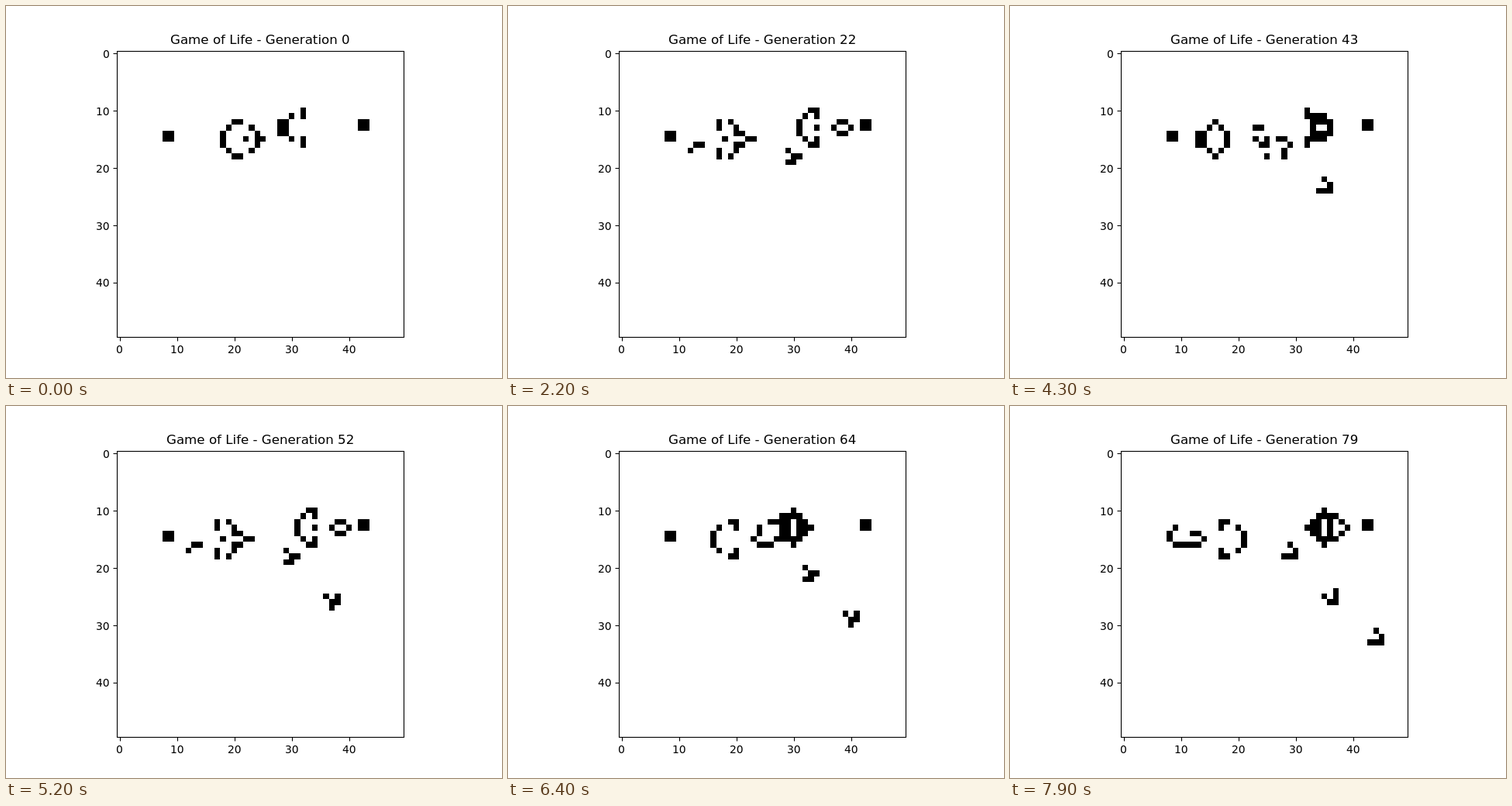
Recreate the animation shown at these times as an HTML page with a canvas. Size 640 by 480 pixels, loop 8 s.

```html
<!DOCTYPE html>
<html lang="en">
<head>
<meta charset="utf-8">
<title>Game of Life</title>
<style>
  html, body { margin: 0; width: 100%; height: 100%; overflow: hidden; background: #fff; }
  canvas { display: block; }
</style>
</head>
<body>
<canvas id="stage" width="640" height="480"></canvas>
<script>
const ctx = document.getElementById('stage').getContext('2d');
const SIZE = 50, STEP = 100, COUNT = 80;
const FONT = '"DejaVu Sans", sans-serif';
const BOX = { left: 143.2, top: 57.6, cell: 7.392 };

// Glider gun, placed with its corner at column 8, row 10.
const GUN = [
  '........................O',
  '......................O.O',
  '............OO......OO............OO',
  '...........O...O....OO............OO',
  'OO........O.....O...OO',
  'OO........O...O.OO....O.O',
  '..........O.....O.......O',
  '...........O...O',
  '............OO'
];

function firstGrid() {
  const grid = new Uint8Array(SIZE * SIZE);
  GUN.forEach((line, r) => {
    [...line].forEach((ch, c) => {
      if (ch === 'O') grid[(r + 10) * SIZE + c + 8] = 1;
    });
  });
  return grid;
}

function nextGrid(grid) {
  const at = (r, c) => r < 0 || c < 0 || r >= SIZE || c >= SIZE ? 0 : grid[r * SIZE + c];
  return grid.map((alive, i) => {
    const r = Math.floor(i / SIZE), c = i % SIZE;
    let n = -alive;
    for (let dr = -1; dr <= 1; dr++)
      for (let dc = -1; dc <= 1; dc++) n += at(r + dr, c + dc);
    return n === 3 || (alive && n === 2) ? 1 : 0;
  });
}

const grids = [firstGrid()];
while (grids.length < COUNT) grids.push(nextGrid(grids[grids.length - 1]));

// align: share of the text width that lies left of x
function label(text, x, y, size, align) {
  ctx.font = `${size}px ${FONT}`;
  const left = Math.round(x - ctx.measureText(text).width * align);
  ctx.fillText(text, left, y);
}

function line(x1, y1, x2, y2) {
  ctx.beginPath();
  ctx.moveTo(x1, y1);
  ctx.lineTo(x2, y2);
  ctx.stroke();
}

function drawCells(grid) {
  const edgeX = c => Math.round(143 + 7.4 * c);
  const edgeY = r => Math.round(57 + 7.4 * r);
  grid.forEach((alive, i) => {
    if (!alive) return;
    const r = Math.floor(i / SIZE), c = i % SIZE;
    const x = edgeX(c), y = edgeY(r);
    ctx.fillRect(x, y, edgeX(c + 1) - x, edgeY(r + 1) - y);
  });
}

function drawAxes() {
  ctx.lineWidth = 1.11;
  ctx.strokeRect(143.5, 58.5, 370, 369);
  for (let n = 0; n < SIZE; n += 10) {
    const x = BOX.left + (n + 0.5) * BOX.cell;
    const y = BOX.top + (n + 0.5) * BOX.cell;
    const px = Math.round(x) + 0.5, py = Math.round(y) + 0.5;
    line(px, 427.5, px, 432.5);
    line(138.5, py, 143.5, py);
    label(String(n), x, 448, 13.889, 0.5);
    label(String(n), 133.48, Math.round(y + 5.5), 13.889, 1);
  }
}

function draw(gen) {
  ctx.fillStyle = '#fff';
  ctx.fillRect(0, 0, 640, 480);
  ctx.fillStyle = ctx.strokeStyle = '#000';
  drawCells(grids[gen]);
  drawAxes();
  label(`Game of Life - Generation ${gen}`, 328, 49, 16.667, 0.5);
}

let start = null;
function tick(now) {
  if (start === null) start = now;
  draw(Math.floor((now - start) / STEP) % COUNT);
  requestAnimationFrame(tick);
}

draw(0);
requestAnimationFrame(tick);
</script>
</body>
</html>
```
